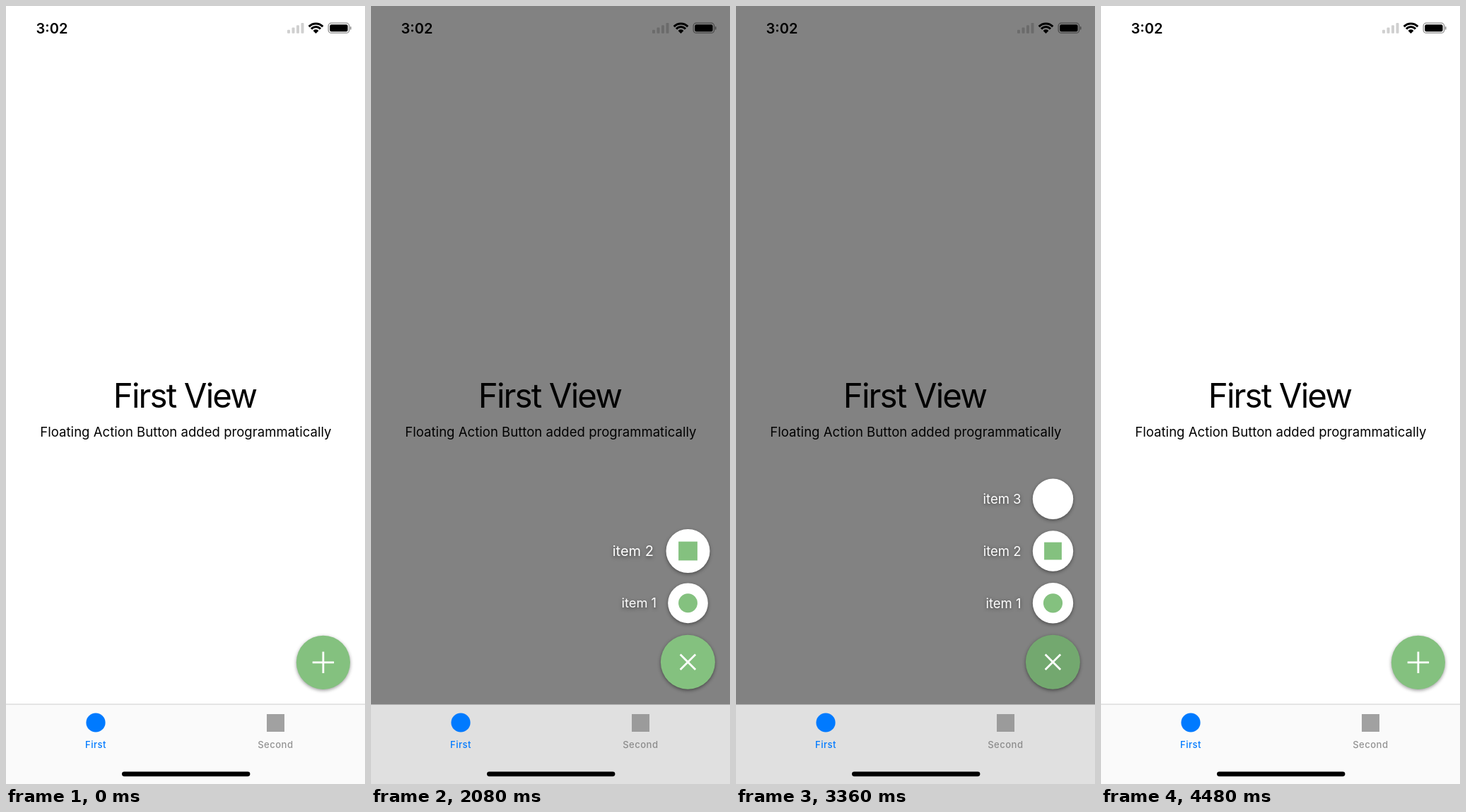
These frames come from a looping animation (508 by 1102 pixels, 4.64 s). An HTML page with a canvas:

```html
<!DOCTYPE html>
<html lang="en">
<head>
<meta charset="utf-8">
<title>Floating action button</title>
<style>
  html, body { margin: 0; width: 100%; height: 100%; overflow: hidden; background: #fff; }
  canvas { display: block; width: 508px; height: 1102px; }
</style>
</head>
<body>
<canvas id="stage" width="508" height="1102"></canvas>
<script>
const ctx = document.getElementById('stage').getContext('2d');
const LOOP = 4640, STEP = 160;
const GREEN = '#84c17f', PRESSED = '#73a86f', BLUE = '#007aff';
const FONT = 'Inter, "Noto Sans", sans-serif';
const ITEM_X = 448.5;

function disc(x, y, r, color) {
  ctx.fillStyle = color;
  ctx.beginPath();
  ctx.arc(x, y, r, 0, Math.PI * 2);
  ctx.fill();
}

function box(x, y, w, h, color, r = 0) {
  ctx.fillStyle = color;
  ctx.beginPath();
  ctx.roundRect(x, y, w, h, r);
  ctx.fill();
}

function label(str, x, y, size, { weight = 400, color = '#000', align = 'left', track = 0 } = {}) {
  ctx.font = `${weight} ${size}px ${FONT}`;
  ctx.letterSpacing = track + 'px';
  ctx.textAlign = align;
  ctx.fillStyle = color;
  ctx.fillText(str, x, y);
}

function shadow(alpha, blur, dy) {
  ctx.shadowColor = `rgba(0,0,0,${alpha})`;
  ctx.shadowBlur = blur;
  ctx.shadowOffsetY = dy;
}

function statusBar(dim) {
  label('3:02', 42.6, 38.5, 20, { weight: 600 });
  for (let i = 0; i < 4; i++) {
    const h = 5 + i * 3.2;
    box(398 + i * 6.5, 38.7 - h, 4, h, dim ? '#6b6b6b' : '#d0d0d0', 1);
  }

  // wifi fan
  ctx.save();
  ctx.beginPath();
  ctx.moveTo(438.5, 39);
  ctx.lineTo(426, 26.5);
  ctx.lineTo(426, 20);
  ctx.lineTo(451, 20);
  ctx.lineTo(451, 26.5);
  ctx.clip();
  ctx.strokeStyle = '#000';
  ctx.lineWidth = 3;
  for (const r of [13.4, 8.7]) {
    ctx.beginPath();
    ctx.arc(438.5, 38.3, r, Math.PI, Math.PI * 2);
    ctx.stroke();
  }
  disc(438.5, 38.3, 5, '#000');
  ctx.restore();

  // battery
  ctx.strokeStyle = dim ? '#4a4a4a' : '#8c8c8c';
  ctx.lineWidth = 1.3;
  ctx.beginPath();
  ctx.roundRect(456.2, 24.2, 29.4, 14, 4);
  ctx.stroke();
  box(458.2, 26.2, 25.4, 10, '#000', 2.2);
  box(486.8, 29, 1.7, 4.6, dim ? '#4a4a4a' : '#8c8c8c', 1);
}

function tabBar(dim) {
  box(0, 989, 508, 113, dim ? '#e0e0e0' : '#fafafa');
  box(0, 988.6, 508, 1, dim ? '#8a8a8a' : '#cdcdcd');
  disc(127, 1015, 13.6, BLUE);
  box(369, 1003, 25, 25, dim ? '#9b9b9b' : '#a1a1a1');
  const style = { weight: 500, align: 'center', track: 0.45 };
  label('First', 127, 1051, 13.1, { ...style, color: BLUE });
  label('Second', 381.3, 1051, 13.1, { ...style, color: dim ? '#8c8c8c' : '#939393' });
  box(164, 1084.4, 181.4, 6.8, '#000', 3.4);
}

function fab(color, open, angle) {
  const x = open ? 448.4 : 448.9, y = open ? 929.3 : 929.8;
  ctx.save();
  shadow(open ? 0.45 : 0.4, 5, 1.6);
  disc(x, y, open ? 38.5 : 38.1, color);
  ctx.restore();
  ctx.save();
  ctx.translate(x, y);
  ctx.rotate(angle * Math.PI / 180);
  box(-15.2, -1.4, 30.4, 2.8, '#fff');
  box(-1.4, -15.2, 2.8, 30.4, '#fff');
  ctx.restore();
}

function item(n, scale, alpha = 1) {
  if (!scale) return;
  ctx.save();
  ctx.translate(ITEM_X, 919.6 - n * 73.8);
  ctx.scale(scale, scale);
  ctx.globalAlpha = alpha;
  // a fading disc no longer hides its own shadow, so the shadow fades faster
  shadow(0.42 * alpha ** 2, 5, 1.8);
  disc(0, 0, 28.7, '#fff');
  shadow(0.5 * alpha ** 2, 5, 1.5);
  label('item ' + n, -45, 6.7, 18.5, { color: '#fff', align: 'right' });
  shadow(0, 0, 0);
  if (n === 1) disc(0, 0, 13.6, GREEN);
  if (n === 2) box(-12.4, -12.4, 24.8, 24.8, GREEN);
  ctx.restore();
}

function items(t) {
  if (t < 2080 || t >= 4320) return;
  if (t >= 4160) {
    item(2, 0.47, 0.15);
    item(1, 1);
    return;
  }
  // each item springs past full size, one step after the one below
  const first = t < 2240, second = t < 2400;
  item(3, first ? 0 : second ? 1.025 : 1);
  item(2, first ? 1.08 : 1);
  item(1, first ? 0.988 : 1);
}

function draw(t) {
  const dim = t >= 2080 && t < 4160;
  const pressed = (t >= 1280 && t < 2080) || (t >= 3360 && t < 4160);
  box(0, 0, 508, 1102, dim ? '#828282' : '#fff');
  statusBar(dim);
  label('First View', 253, 569.3, 47.4, { align: 'center', track: -1.85 });
  label('Floating Action Button added programmatically', 254.4, 609.8, 18.5, { align: 'center', track: 0.04 });
  tabBar(dim);
  items(t);
  const angle = dim ? 45 : t >= 4160 && t < 4320 ? 3 : 0;
  fab(pressed ? PRESSED : GREEN, t >= 2080 && t < 4480, angle);
}

const start = performance.now();
function tick() {
  const t = (performance.now() - start) % LOOP;
  draw(Math.floor(t / STEP) * STEP);
  requestAnimationFrame(tick);
}
tick();
</script>
</body>
</html>
```
